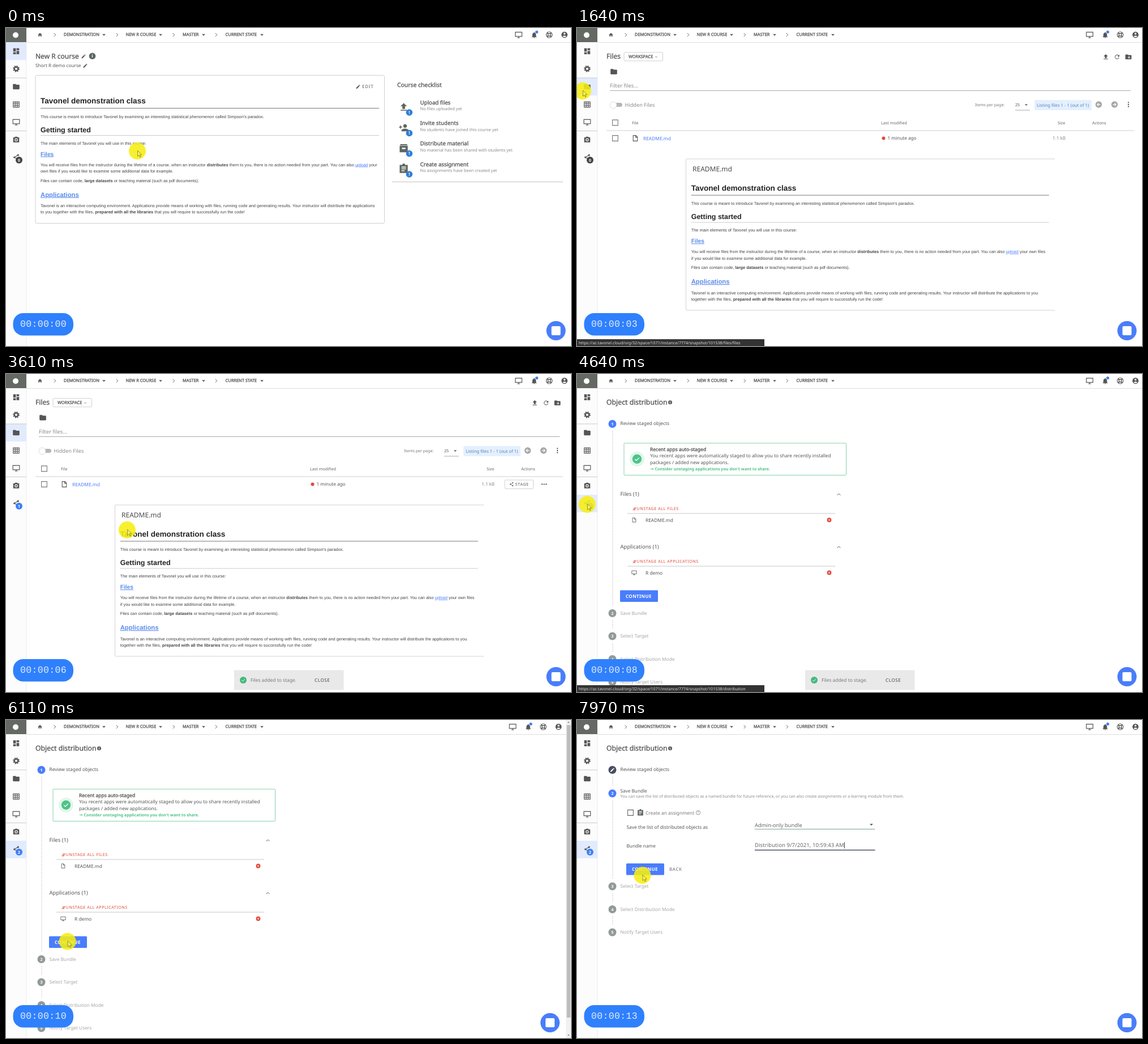
Recreate the animation shown at these times as an HTML page. Size 998x561 px, loop 8 s.

```html
<!DOCTYPE html>
<html lang="en">
<head>
<meta charset="utf-8">
<title>Course distribution walkthrough</title>
<style>
html, body { margin: 0; width: 100%; height: 100%; overflow: hidden; background: #fff; }
svg { display: block; width: 100vw; height: 100vh; font-family: "Noto Sans", "Open Sans", sans-serif; text-rendering: geometricPrecision; }
.doc { font-family: "Liberation Sans", Arial, sans-serif; }
.mono { font-family: "Liberation Mono", "DejaVu Sans Mono", monospace; }
text { white-space: pre; }
</style>
</head>
<body>
<svg id="stage" viewBox="0 0 998 561"></svg>
<script>
const LOOP = 8000;
const INK = '#555', GREY = '#8a8a8a', BLUE = '#4a7dfb', GREEN = '#4cc488', RED = '#e2493b';
const BRAND = 'Tavonel';
const SITE = 'https://az.tavonel.cloud/org/32/space/1071/instance/7774/snapshot/101538/';

// y is the middle of the capitals; **bold** and _link_ are inline marks
function text(x, y, str, size = 8.35, fill = INK, attrs = '') {
  const body = str
    .replace(/\*\*(.+?)\*\*/g, '<tspan font-weight="700">$1</tspan>')
    .replace(/_(.+?)_/g, '<tspan fill="#4a7dfb" text-decoration="underline">$1</tspan>');
  return `<text x="${x}" y="${(y + size * 0.357).toFixed(2)}" font-size="${size}" fill="${fill}" ${attrs}>${body}</text>`;
}
// a hairline stroke stands in for the medium weight
const MED = `stroke="${INK}" stroke-width=".3"`, SEMI = 'font-weight="600"', MID = 'text-anchor="middle"';
const spaced = (n, w = 400) => `font-weight="${w}" letter-spacing="${n}"`;
const rect = (x, y, w, h, fill, attrs = '') => `<rect x="${x}" y="${y}" width="${w}" height="${h}" fill="${fill}" ${attrs}/>`;
const circle = (x, y, r, fill, attrs = '') => `<circle cx="${x}" cy="${y}" r="${r}" fill="${fill}" ${attrs}/>`;
const rule = (x1, x2, y, color, w = 1) => `<path d="M${x1} ${y}H${x2}" stroke="${color}" stroke-width="${w}"/>`;
const group = (id, body, attrs = '') => `<g id="${id}" ${attrs}>${body}</g>`;
const path = d => `<path d="${d}"/>`;
const line = (d, w = 2, color = 'currentColor') => `<path d="${d}" fill="none" stroke="${color}" stroke-width="${w}"/>`;
const ring = (r, w, attrs = '') => `<circle cx="12" cy="12" r="${r}" fill="none" stroke="currentColor" stroke-width="${w}" ${attrs}/>`;

// 24-unit icons
const ICONS = {
  dash: path('M3 13h8V3H3zM3 21h8v-6H3zM13 21h8V11h-8zM13 3v6h8V3z'),
  gear: ring(5.6, 4) + ring(8.5, 3, 'stroke-dasharray="3.4 3.28"'),
  folder: path('M10 4H4a2 2 0 0 0-2 2v12a2 2 0 0 0 2 2h16a2 2 0 0 0 2-2V8a2 2 0 0 0-2-2h-8z'),
  table: line('M3 4h18v16H3zM3 9h18M3 14.500h18M9 4v16M15 4v16'),
  screen: line('M2 4h20v13H2zM8 21h8M12 17v4'),
  camera: path('M9 3 7 5H3v15h18V5h-4l-2-2z') + '<circle cx="12" cy="12.500" r="3.700" fill="none" stroke="#fff" stroke-width="2"/>',
  share: line('M18 5 6 12l12 7') + '<circle cx="18" cy="5" r="3"/><circle cx="6" cy="12" r="3"/><circle cx="18" cy="19" r="3"/>',
  home: path('M10 20v-6h4v6h5v-8h3L12 3 2 12h3v8z'),
  bell: path('M12 22a2 2 0 0 0 2-2h-4a2 2 0 0 0 2 2zm6-6v-5c0-3-1.600-5.600-4.500-6.300V4a1.500 1.500 0 0 0-3 0v.7C7.600 5.400 6 8 6 11v5l-2 2v1h16v-1z'),
  buoy: ring(9, 2) + ring(4, 2) + line('M5.500 5.500l4 4M18.500 5.500l-4 4M5.500 18.500l4-4M18.500 18.500l-4-4', 3),
  user: '<circle cx="12" cy="12" r="10"/><circle cx="12" cy="8.500" r="3.200" fill="#fff"/><path d="M6 17a7 5 0 0 1 12 0 8 8 0 0 1-12 0" fill="#fff"/>',
  pencil: path('M3 17.200V21h3.800L17.800 9.900l-3.700-3.700zM20.700 7a1 1 0 0 0 0-1.400l-2.300-2.300a1 1 0 0 0-1.400 0l-1.900 1.800 3.800 3.800z'),
  upload: path('M9 16h6v-6h4l-7-7-7 7h4zM5 18h14v2H5z'),
  refresh: path('M17.650 6.350A8 8 0 1 0 19.730 14h-2.080A6 6 0 1 1 12 6c1.660 0 3.140.69 4.220 1.780L13 11h7V4z'),
  file: line('M5 3h9l5 5v13H5zM13 3v6h6'),
  invite: path('M15 12a4 4 0 1 0 0-8 4 4 0 0 0 0 8zm0 2c-2.700 0-8 1.300-8 4v2h16v-2c0-2.700-5.300-4-8-4z') + line('M5 7v7M1.500 10.500h7'),
  archive: path('M5 3h14l2 3H3zM3 7h18v14H3z') + '<path d="M8 11h8v3H8z" fill="#fff"/>',
  clip: path('M3 3h6a3 3 0 0 1 6 0h6v18H3z') + line('M7 8h10M7 12h10M7 16h7', 2, '#fff'),
  check: line('M4 12.500l5.500 5.500L20 7', 3),
  up: line('M5 15.500l7-7 7 7', 2.4),
  down: line('M5 8.500l7 7 7-7', 2.8),
  next: line('M8.500 4l8 8-8 8', 2.4),
  caret: path('M5 9h14l-7 7z'),
  box: line('M3 3h18v18H3z', 2),
  go: '<circle cx="12" cy="12" r="11"/>' + line('M6 12h11M12 7l5 5-5 5', 2.4, '#fff'),
  arrow: line('M3 12h17M14 6l6 6-6 6', 3),
  clear: line('M8 6h15M5 12h15M2 18h15', 3.6),
  dots: '<circle cx="4" cy="12" r="2.500"/><circle cx="12" cy="12" r="2.500"/><circle cx="20" cy="12" r="2.500"/>'
};
function icon(name, cx, cy, size, color = INK, turn = 0) {
  const s = size / 24;
  return `<g transform="translate(${cx} ${cy}) rotate(${turn}) scale(${s}) translate(-12 -12)" fill="${color}" color="${color}">${ICONS[name]}</g>`;
}

function doc(x, y, width, wide) {
  const p = (dy, s) => text(0, dy, s, 7.42, '#444');
  const head = (dy, s, size, fill = '#222', more = '') => text(0, dy, s, size, fill, `font-weight="700" ${more}`);
  const lines = wide
    ? ['_upload_ your own files', 'if you', 'applications to you', 'together']
    : ['_upload_ your', 'own files if you', 'applications', 'to you together'];
  return `<g class="doc" transform="translate(${x} ${y})">` +
    head(0, BRAND + ' demonstration class', 13.55) + rule(0, width, 13, '#777') +
    p(27.5, `This course is meant to introduce ${BRAND} by examining an interesting statistical phenomenon called Simpson's paradox.`) +
    head(51, 'Getting started', 12.5) + rule(0, width, 61, '#ccc') +
    p(74.5, `The main elements of ${BRAND} you will use in this course:`) +
    head(93.5, 'Files', 10.2, '#5b8cec', 'text-decoration="underline"') +
    p(112.5, `You will receive files from the instructor during the lifetime of a course, when an instructor **distributes** them to you, there is no action needed from your part. You can also ${lines[0]}`) +
    p(124, `${lines[1]} would like to examine some additional data for example.`) +
    p(140.5, 'Files can contain code, **large datasets** or teaching material (such as pdf documents).') +
    head(165, 'Applications', 11.3, '#5b8cec', 'text-decoration="underline"') +
    p(185, `${BRAND} is an interactive computing environment. Applications provide means of working with files, running code and generating results. Your instructor will distribute the ${lines[2]}`) +
    p(196, `${lines[3]} with the files, **prepared with all the libraries** that you will require to successfully run the code!`) + '</g>';
}

function topBar() {
  const crumbs = [['DEMONSTRATION', 102, 173], ['NEW R COURSE', 211.5, 273], ['MASTER', 312, 349], ['CURRENT STATE', 387.5, 452]];
  return rule(36, 998, 25.5, '#dedede') + icon('home', 60, 12, 9) +
    [86, 196, 296, 371].map(x => icon('next', x, 12, 9)).join('') +
    crumbs.map(([s, x, c]) => text(x, 11.5, s, 7.45, INK, MED) + icon('caret', c, 12, 10)).join('') +
    group('account', icon('screen', 905.5, 12, 14) + icon('bell', 933, 12.5, 13) + circle(937.5, 7, 2.6, '#3f7ff5') +
      icon('buoy', 959.5, 12, 14) + icon('user', 986.500, 12, 13));
}

function sideBar() {
  const hot = (id, y) => rect(0, y, 36, 31, '#e2ebfd', `id="${id}"`);
  const icons = [['dash', 41], ['gear', 72], ['folder', 103.5], ['table', 135], ['screen', 166], ['camera', 197]];
  return rect(0, 25, 36, 536, '#fcfcfd') + `<path d="M36 25V561" stroke="#ececf0"/>` +
    hot('hotDash', 25.5) + hot('hotFiles', 88) + hot('hotShare', 213) +
    rule(0, 36, 88, '#c5cfc8') + rule(0, 36, 181.5, '#c5cfc8') +
    icons.map(([n, y]) => icon(n, 18, y, 14)).join('') + icon('share', 18, 228, 13) +
    circle(23, 233, 6, '#444', 'id="badge"') + text(23, 233, '0', 7, '#fff', `id="count" ${MID} ${SEMI}`) +
    rect(0, 0, 36, 25, '#646963') + circle(17, 12.5, 5, '#fff');
}

function dashPage() {
  const rows = [
    ['Upload files', 'No files uploaded yet', 131.5, 'upload'],
    ['Invite students', 'No students have joined this course yet', 168, 'invite'],
    ['Distribute material', 'No material has been shared with students yet', 204, 'archive'],
    ['Create assignment', 'No assignments have been created yet', 240.5, 'clip']
  ];
  return text(52, 49.5, 'New R course', 12, INK, MED) + icon('pencil', 137, 50, 9) +
    circle(152.5, 49.5, 5.8, '#5d665f') + text(152.5, 49.5, 'i', 8, '#fff', `${MID} ${SEMI}`) +
    text(52, 66.5, 'Short R demo course', 8.2) + icon('pencil', 140, 66.5, 9) +
    rect(52, 83.5, 616.5, 261, '#fff', 'stroke="#cfcfd4" rx="2.500"') +
    icon('pencil', 622, 103.5, 9) + text(629, 103.5, 'EDIT', 7.8, INK, spaced(0.9)) +
    doc(61, 128.500, 598, false) +
    text(691, 100.5, 'Course checklist', 10.35, INK, MED) +
    rows.map(([a, b, y, n]) => text(731.5, y, a, 9.7, INK, MED) + text(731.5, y + 11, b, 7.46, GREY) +
      icon(n, 702.5, y + 8, 19, '#5d665f') + circle(712.3, y + 17.5, 5.8, '#2f7fd6') +
      text(712.3, y + 17.5, '!', 8, '#fff', `${MID} font-weight="700"`)).join('') +
    rule(682, 984, 271.5, '#c4c4c4');
}

function filesPage() {
  const head = (x, s) => text(x, 167, s, 7.2, '#666');
  return text(52, 49.5, 'Files', 12.1, INK, MED) +
    rect(83, 43, 68.5, 15, '#fff', 'stroke="#d0d0d0" rx="2"') + text(91, 50.5, 'WORKSPACE', 7.4, INK, MED) + icon('down', 140, 51, 6) +
    icon('upload', 934, 51, 13) + icon('refresh', 954, 51, 12) + icon('folder', 974, 51, 13) + text(975, 51.500, '+', 9, '#fff', `${MID} font-weight="700"`) +
    icon('folder', 65, 77, 14) + text(58, 101.5, 'Filter files...', 9.3, GREY) + rule(58, 978, 110.5, '#a3afa6') +
    rect(61, 132, 19, 7, '#b5b5b5', 'rx="3.500"') + circle(64, 136, 6, '#fff', 'stroke="#dcdcdc"') + text(84.5, 135.5, 'Hidden Files', 9.2, GREY) +
    text(703, 135.5, 'Items per page:', 7.05, '#777') + text(774, 135.5, '25', 7.2) + icon('caret', 793.5, 135.5, 9) + rule(774, 800, 145, '#aaa') +
    rect(808, 127, 101, 18, '#e4f0fd', 'rx="2"') + text(812, 136, 'Listing files 1 - 1 (out of 1)', 7.7, '#5580c4') +
    icon('go', 921.500, 135, 12.5, '#a6a6a6', 180) + icon('go', 949.500, 135, 12.5, '#a6a6a6') + icon('dots', 974, 135, 11, INK, 90) +
    icon('box', 67.5, 167, 13, '#777') + head(97, 'File') + head(537, 'Last modified') + head(849, 'Size') + head(910, 'Actions') +
    group('list',
      rect(52, 181, 932, 27, '#efedef', 'id="rowHot"') + rule(52, 984, 181, '#cfcfcf') +
      icon('box', 67.5, 194.5, 13, '#777') + icon('file', 103, 194.5, 13) + text(117, 194.5, 'README.md', 8.4, BLUE) +
      circle(541.5, 194.5, 3, RED) + text(548.5, 194.5, '1 minute ago', 8.2) + text(840, 194.5, '1.1 kB', 8.1, GREY) +
      group('stageBtn', rect(881, 187, 50.5, 15.5, '#fff', 'id="stageBox" stroke="#d0d0d0" rx="2"') +
        icon('share', 893, 194.5, 8.500) + text(899.5, 194.5, 'STAGE', 7, INK, spaced(0.7)) + icon('dots', 950.5, 194.5, 11)) +
      `<path d="M844 231H194.500a2 2 0 0 0-2 2V496a2 2 0 0 0 2 2H844" fill="none" stroke="#d5cfd8"/>` +
      text(204, 248.500, 'README.md', 12, '#4a4a4a') + doc(201.7, 282, 632, true));
}

function stepDot(y, n, id) {
  return circle(62.5, y, 7, '#929a95', `id="${id}"`) + text(62.5, y, n, 7, '#fff', `${MID} ${SEMI} id="${id}Num"`);
}
function stagedList(title, action, name, glyph, y) {
  return text(76.5, y, title, 9.5) + icon('up', 462.5, y + 0.5, 10) +
    icon('clear', 101.500, y + 26, 7, RED) + text(105.5, y + 25.5, action, 7.2, RED, 'letter-spacing="0.5"') +
    rule(89, 456, y + 34, '#c2cac5') + icon(glyph, 101, y + 45.5, 10) + text(121, y + 45.5, name, 8.4) +
    circle(445.5, y + 45.5, 3.9, RED) + `<path d="M444 ${y + 44}l3 3m0-3l-3 3" stroke="#fff"/>`;
}
function objectPage() {
  const idle = (id, n, s) => group(id, stepDot(0, n, id + 'Dot') + text(76.5, 0, s, 8.3, '#a6a6a6'));
  const button = (x, y) => rect(x, y, 67, 20.5, BLUE, 'rx="1.500"') + text(x + 10, y + 10.200, 'CONTINUE', 8.1, '#fff', spaced(0.35, 600));
  return text(52, 49.5, 'Object distribution', 12.25, INK, MED) + circle(164.5, 50, 3.6, '#5d665f') + text(164.5, 50, 'i', 5.5, '#fff', `${MID} ${SEMI}`) +
    [1, 2, 3, 4].map(i => `<path id="link${i}" stroke="#c6c6c6" stroke-dasharray="2 1.500"/>`).join('') +
    stepDot(88, '1', 'one') + group('edit', icon('pencil', 62.5, 88, 9, '#fff')) + text(76.500, 87.5, 'Review staged objects', 8.38) +
    `<clipPath id="clipA"><rect id="clipARect" x="36" y="100" width="960" height="300"/></clipPath>` +
    group('review',
      rect(83, 122, 392.5, 56.5, '#fff', 'stroke="#86d3ab" rx="1"') +
      circle(106, 150, 13, '#e2f6eb') + circle(106, 150, 8.2, GREEN) + icon('check', 106, 150, 11, '#fff') +
      text(129, 132.5, 'Recent apps auto-staged', 8.5, INK, MED) +
      text(129, 144.500, 'You recent apps were automatically staged to allow you to share recently installed', 8.33) +
      text(129, 156, 'packages / added new applications.', 8.33) +
      icon('arrow', 132.500, 167.500, 7, GREEN) + text(137.5, 167, "Consider unstaging applications you don't want to share.", 7.15, GREEN, SEMI) +
      stagedList('Files (1)', 'UNSTAGE ALL FILES', 'README.md', 'file', 212) +
      stagedList('Applications (1)', 'UNSTAGE ALL APPLICATIONS', 'R demo', 'screen', 305) +
      button(76, 381.500), 'clip-path="url(#clipA)"') +
    group('two', stepDot(0, '2', 'twoDot') + group('twoIdle', text(76.5, 0, 'Save Bundle', 8.2, '#a6a6a6')) +
      group('twoOpen', text(76.500, -4.500, 'Save Bundle', 8.2, INK, 'id="twoTitle"') +
        text(76.5, 4.5, 'You can save the list of distributed objects as a named bundle for future reference, or you can also create assignments or a learning module from them.', 7.06, GREY))) +
    `<clipPath id="clipB"><rect id="clipBRect" x="36" y="17" width="960" height="0"/></clipPath>` +
    group('bundle',
      `<g clip-path="url(#clipB)">` + icon('box', 94.5, 34, 13, '#666') + icon('clip', 112, 34, 13, '#5d665f') +
      text(121, 34, 'Create an assignment', 8.4, '#777') + circle(214, 34, 3.6, 'none', 'stroke="#777" stroke-width=".8"') + text(214, 34, '?', 5.5, '#777', MID) +
      text(87.5, 59.5, 'Save the list of distributed objects as', 8.4) + text(314, 56.500, 'Admin-only bundle', 9.4, '#666') + icon('caret', 520, 55, 10) + rule(314, 526.5, 63, '#79a58b') +
      text(87.5, 93, 'Bundle name', 8.2) + text(314, 91.5, 'Distribution 9/7/2021, 10:59:43 AM', 9.5, '#666', 'letter-spacing=".08"') +
      `<path d="M472.500 86V97" stroke="#333"/>` + rule(314, 526.5, 100, '#4b4f66', 1.3) +
      button(87, 123.500) + text(163, 134, 'BACK', 7.900, '#666', spaced(0.7)) + '</g>') +
    idle('three', '3', 'Select Target') + idle('four', '4', 'Select Distribution Mode') + idle('five', '5', 'Notify Target Users');
}

function overlays() {
  return group('bar', rect(989, 0, 9, 561, '#f1f1f1') + rect(990.5, 9, 6.500, 516, '#bdbdbd') + icon('caret', 993.7, 4, 6, INK, 180) + icon('caret', 993.7, 556, 6)) +
    group('toast', rect(403, 522.500, 193.5, 35, '#e9e9e9') + circle(419, 540, 6, '#43b97c') + icon('check', 419, 540, 8, '#fff') +
      text(432, 540, 'Files added to stage.', 8.4, '#777') + text(545, 540, 'CLOSE', 8.1, '#444', spaced(0.6))) +
    group('chat', circle(971.5, 534, 17, BLUE) + rect(963.500, 526, 16, 16, '#fff', 'rx="2"')) +
    rect(12.5, 503, 106.5, 39.5, '#2f80fd', 'rx="18"') +
    text(25, 521.5, '', 16.6, '#e3edff', 'id="clock" class="mono" letter-spacing=".3"') +
    group('status', rect(0, 549, 331, 12, '#333') + text(3, 555.500, '', 7.08, '#ddd', 'id="url"')) +
    group('pointer', circle(0, 0, 15, '#f6ee12', 'id="spot"') +
      `<path id="arrow" d="M.500 -1V9.500L3 7.200 4.700 11 6.200 10.300 4.500 6.700H7.800z" fill="#f8f26a" stroke="#8f8a2a" stroke-width=".9"/>`);
}

document.getElementById('stage').innerHTML =
  group('dash', dashPage()) + group('files', filesPage()) + group('object', objectPage()) + topBar() + sideBar() + overlays();

const $ = id => document.getElementById(id);
const show = (id, on) => $(id).setAttribute('display', on ? 'inline' : 'none');
const set = (id, name, v) => $(id).setAttribute(name, v);
const move = (id, x, y) => set(id, 'transform', `translate(${x} ${y})`);
const ease = p => { p = Math.min(1, Math.max(0, p)); return p * p * (3 - 2 * p); };
const within = (t, a, b) => t >= a && t < b;

// time, x, y of the pointer
const TRAIL = [
  [0, 232, 217], [210, 232, 217], [750, 10, 111], [1830, 10, 111], [2660, 911, 200], [3060, 911, 200],
  [3610, 215, 275], [3880, 18, 230], [5100, 18, 230], [5310, 59, 230], [5430, 61, 230], [6150, 109, 392],
  [6400, 109, 392], [6830, 170.5, 389], [7180, 170.5, 389], [7860, 115.5, 274], [8000, 115.5, 274]
];
const CLICKS = [[1050, 1290], [2880, 3040], [4230, 4590], [6200, 6330]];

function slope(i, k) {
  const a = TRAIL[i - 1], b = TRAIL[i], c = TRAIL[i + 1];
  if (!a || !c || (b[k] - a[k]) * (c[k] - b[k]) <= 0) return 0;
  return (c[k] - a[k]) / (c[0] - a[0]);
}
function along(t, k) {
  let i = 0;
  while (i < TRAIL.length - 2 && t >= TRAIL[i + 1][0]) i++;
  const a = TRAIL[i], b = TRAIL[i + 1], d = b[0] - a[0], u = (t - a[0]) / d, e = ease(u);
  return a[k] + (b[k] - a[k]) * e + d * u * (1 - u) * ((1 - u) * slope(i, k) - u * slope(i + 1, k));
}

function render(t) {
  const page = t < 1290 ? 'dash' : t < 4600 ? 'files' : 'object';
  for (const p of ['dash', 'files', 'object']) show(p, p === page);

  const x = along(t, 1), y = along(t, 2);
  const pressed = CLICKS.some(([a, b]) => within(t, a, b));
  move('pointer', x.toFixed(2), y.toFixed(2));
  set('spot', 'r', pressed ? 17.5 : 15);
  set('spot', 'fill', pressed ? '#ffe92e' : '#f6ee12');
  set('spot', 'opacity', pressed ? 1 : 0.88);
  show('arrow', !pressed);

  const onFiles = x < 36 && within(y, 88, 119), onShare = x < 36 && within(y, 213, 244);
  show('hotDash', page === 'dash');
  show('hotFiles', page === 'files' || onFiles);
  show('hotShare', page === 'object' || onShare);
  show('status', onFiles || onShare);
  $('url').textContent = SITE + (onFiles ? 'files/files' : 'distribution');

  show('list', t >= 1440);
  show('rowHot', x > 52 && within(y, 181, 208));
  show('stageBtn', t >= 2420);
  set('stageBox', 'fill', within(t, 2870, 3100) ? '#bcbcbc' : '#fff');

  const count = t < 3150 ? 0 : t < 5000 ? 1 : 2;
  $('count').textContent = count;
  set('badge', 'fill', count ? '#3f7ff5' : '#444');

  const scrolls = within(t, 4660, 6760), shift = scrolls ? -10.5 : 0;
  show('bar', scrolls);
  move('account', shift, 0);
  move('chat', shift, 0);
  move('toast', shift / 2, 0);
  show('toast', within(t, 3250, 5900));
  set('toast', 'opacity', Math.min(ease((t - 3230) / 100), 1 - ease((t - 5800) / 100)));
  $('clock').textContent = '00:00:' + String(Math.floor(0.24 + t * 0.001685)).padStart(2, '0');

  const next = t >= 6740;
  const y2 = 422 - 292.5 * ease((t - 6740) / 188);
  const y3 = y2 + 40.5 + 123.5 * ease((t - 6825) / 250);
  const stops = [88, y2, y3, y3 + 40.5, y3 + 81];
  ['two', 'three', 'four', 'five'].forEach((id, i) => move(id, 0, stops[i + 1]));
  for (let i = 1; i < 5; i++) set('link' + i, 'd', `M63 ${stops[i - 1] + 12}V${stops[i] - 13}`);
  show('edit', next);
  show('oneNum', !next);
  set('one', 'fill', next ? '#4a4d5e' : BLUE);
  set('twoDot', 'fill', next ? BLUE : '#929a95');
  show('twoIdle', !next);
  show('twoOpen', next);
  set('twoTitle', 'opacity', 0.6 + 0.4 * ease((t - 6830) / 200));
  set('clipARect', 'height', Math.max(0, y2 - 117));
  show('review', y2 > 135);
  move('bundle', 0, y2);
  set('clipBRect', 'height', Math.max(0, y3 - y2 - 34));
  show('bundle', t > 6860);
}

const start = performance.now();
function tick() {
  render((performance.now() - start) % LOOP);
  requestAnimationFrame(tick);
}
tick();
</script>
</body>
</html>
```
